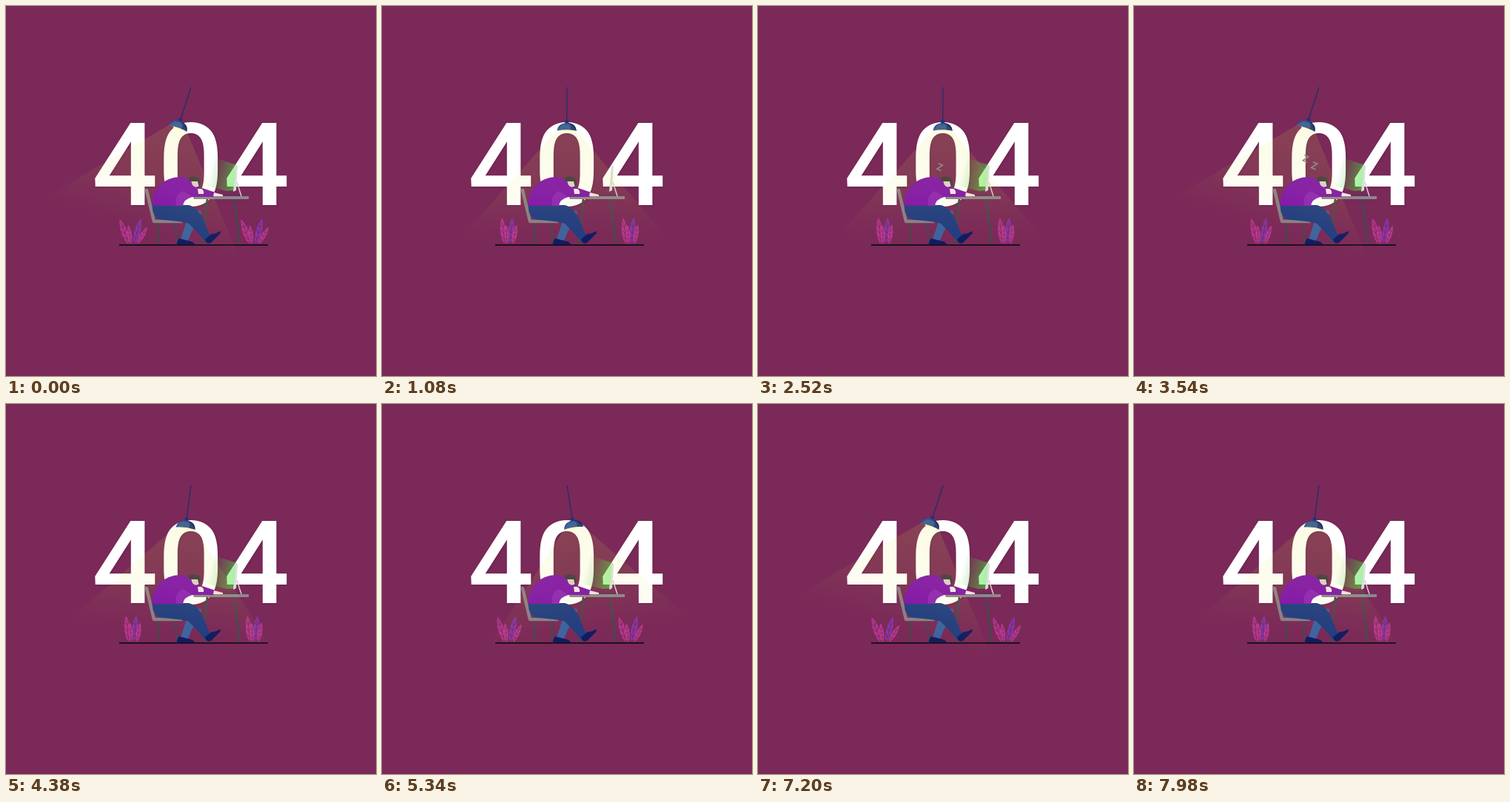
Animation of 500 by 500 pixels, one loop 8 s. Source, as an HTML page:

```html
<!DOCTYPE html>
<html lang="en">
<head>
<meta charset="utf-8">
<title>404</title>
<style>
  html, body { margin: 0; width: 100%; height: 100%; overflow: hidden; background: #7a2958; }
  svg { display: block; width: 100vw; height: 100vh; }
  text { font-family: Roboto, Arial, sans-serif; text-anchor: middle; }
  .code { font-size: 156.5px; font-weight: 500; fill: #fff; filter: drop-shadow(1.5px 1.5px 1px #4a173755); }
  .snore { font-weight: 700; fill: #858087; dominant-baseline: central; }
</style>
</head>
<body>
<svg viewBox="0 0 500 500">
  <defs>
    <linearGradient id="lampFade" gradientUnits="userSpaceOnUse" x1="0" y1="50" x2="0" y2="212">
      <stop stop-color="#e2e63c" stop-opacity=".14"/>
      <stop offset=".55" stop-color="#e2e63c" stop-opacity=".08"/>
      <stop offset="1" stop-color="#dc7850" stop-opacity="0"/>
    </linearGradient>
    <linearGradient id="screenFade" gradientUnits="userSpaceOnUse" x1="313" y1="232" x2="276" y2="222">
      <stop stop-color="#46ee3a" stop-opacity=".56"/>
      <stop offset=".4" stop-color="#46de3a" stop-opacity=".36"/>
      <stop offset="1" stop-color="#46b43a" stop-opacity="0"/>
    </linearGradient>
    <g id="leaf">
      <path d="M0 0C-5.500 -8 -5.500 -25 0 -36C5.500 -26 5.500 -9 0 0Z"/>
      <path d="M0 0V-31M-4 -12L0 -7L4 -13M-4 -20L0 -15L4 -21M-3 -27L0 -23L3 -28" fill="none" stroke="#7a2958" stroke-width=".8"/>
    </g>
  </defs>

  <text class="code" x="249.700" y="268.800">404</text>

  <path id="glow" d="M312 215L276 203L267 242L298 250L309 249Z" fill="url(#screenFade)"/>

  <g id="plants"></g>

  <g fill="none" stroke-linecap="round">
    <path d="M272 262L266 321M309 262L315 321" stroke="#4a4650" stroke-width="3"/>
    <path d="M207 293L205 321M229 293L231 320" stroke="#49454c" stroke-width="2.500"/>
    <path d="M190 249L200 291H237" stroke="#888087" stroke-width="4.500" stroke-linejoin="round"/>
  </g>

  <path d="M246 276L264 277Q263 289 251 305L246 317L236 315L243 294Z" fill="#3b63a0"/>
  <path d="M234 314L245 317Q254 318 255 322H231Q231 317 234 314Z" fill="#0e1c63"/>
  <path d="M198 269H247C260 272 267 287 274 307L279 311L270 319Q259 306 247 294Q239 291 210 289Q197 286 198 269Z" fill="#203d82"/>
  <path d="M269 315L278 308Q284 308 289 304L290 307L277 320Q271 323 269 315Z" fill="#0e1c63"/>

  <path d="M252 257H328V261H254Z" fill="#8d858d"/>
  <path d="M197 270C198 252 206 240 220 234Q232 229 243 232L262 245L283 252L281 258H245Q239 260 239 270Z" fill="#8012ad"/>
  <path d="M239 250Q227 256 230 270H239Q240 261 252 258Z" fill="#8f22b8"/>
  <path d="M250 236Q256 232 261 237L261 243Q256 247 252 242Z" fill="#e3ccd0"/>
  <path d="M246 235C247 229 259 229 262 234Q265 241 261 245L259 237L249 237Z" fill="#3f3841"/>
  <path d="M259 247H264Q268 249 267 254H260Z" fill="#f5e8ea"/>
  <path d="M281 252L293 255V257H280Z" fill="#f5e1e4"/>

  <path d="M312 238L318 257" stroke="#d7d0d9" stroke-width="1.500"/>
  <path d="M310 216H313L311 249L307 251Z" fill="#d8ded9"/>
  <path d="M294 257L297 255H317V257Z" fill="#5d3058"/>
  <path d="M153 323H354" stroke="#1e1020" stroke-width="2"/>
  <g id="snores"></g>

  <g id="lamp">
    <path d="M0 0V46" stroke="#1d2f6b" stroke-width="1.200"/>
    <ellipse cy="57.500" rx="7" ry="2.500" fill="#fffde0"/>
    <path d="M-2.500 49V45Q0 42 2.500 45V49Z" fill="#1d3475"/>
    <path d="M-13 58.500C-12 44.500 12 44.500 13 58.500Q0 56 -13 58.500Z" fill="#2b519b"/>
    <path d="M2 48C9 49 12.500 52 13 58.500Q9 57.500 5 57.300Q6 52 2 48Z" fill="#172c70"/>
    <path d="M-6 50H6L144 212H-150Z" fill="url(#lampFade)"/>
  </g>
</svg>
<script>
  const LOOP = 8000, CYCLE = 3600;
  const byId = id => document.getElementById(id);

  function add(parent, tag, attributes) {
    const node = document.createElementNS("http://www.w3.org/2000/svg", tag);
    for (const name in attributes) node.setAttribute(name, attributes[name]);
    return parent.appendChild(node);
  }

  // Base offset, lean in degrees, scale, colour.
  const leafShapes = [
    [1, 15, 1, "#8536ad"],
    [-6, -20, 1, "#b53690"],
    [-3, -8, .72, "#bd3a94"],
    [5, 31, .75, "#bd3a94"],
  ];
  const leaves = [172, 336].flatMap(x => leafShapes.map(([offset, lean, scale, fill]) => ({
    node: add(byId("plants"), "use", { href: "#leaf", fill }), x: x + offset, lean, scale
  })));
  const snores = [0, 1, 2].map(() => {
    const node = add(byId("snores"), "text", { class: "snore" });
    node.textContent = "Z";
    return node;
  });

  function draw(time) {
    const phase = (time % LOOP) % CYCLE / CYCLE;
    const swing = 4.5 + 13.5 * Math.cos(2 * Math.PI * phase);
    byId("lamp").setAttribute("transform", `translate(250 110) rotate(${swing})`);

    const dark = phase > .27 && phase < .36 || phase > .75 && phase < .84;
    byId("glow").setAttribute("visibility", dark ? "hidden" : "visible");

    const spread = (.65 + .35 * Math.cos(4 * Math.PI * phase)) * (1 - .4 * phase);
    for (const { node, x, lean, scale } of leaves)
      node.setAttribute("transform", `translate(${x} 322) rotate(${lean * spread}) scale(${scale})`);

    // A stream of letters rises from the head late in each cycle.
    const spacing = .47;
    const lead = .36 + 7 * (phase - .7);
    const newest = Math.floor(lead / spacing);
    snores.forEach((node, i) => {
      const index = newest - i;
      const p = lead - index * spacing;
      const x = 250 - 8 * p - 12 * p * p;
      const y = 225 - 20 * p;
      node.setAttribute("visibility", index >= 0 && p <= 1 ? "visible" : "hidden");
      node.setAttribute("font-size", 9 + 16 * p * (1 - .8 * p));
      node.setAttribute("transform", `translate(${x} ${y}) rotate(22)`);
    });
  }

  const start = performance.now();
  function tick() {
    draw(performance.now() - start);
    requestAnimationFrame(tick);
  }
  tick();
</script>
</body>
</html>
```
